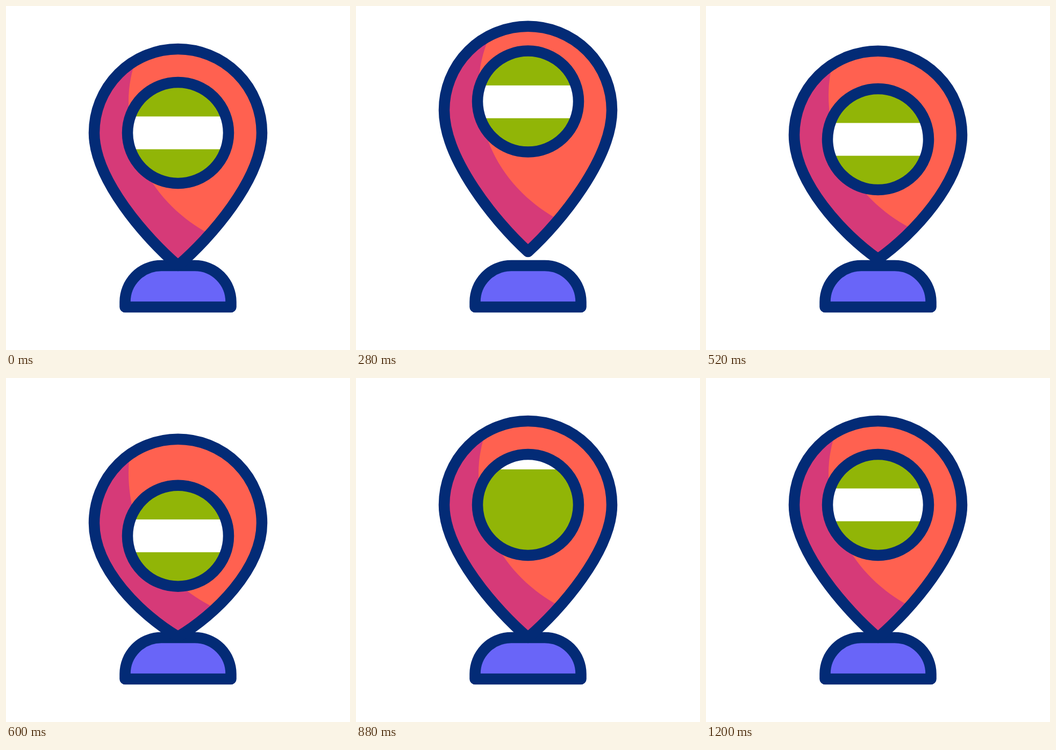
An HTML page for the animation above (1480 ms loop, 640 by 640 pixels).

```html
<!DOCTYPE html>
<html lang="en">
<head>
<meta charset="utf-8">
<title>Map pin</title>
<style>
  html, body { margin: 0; width: 100%; height: 100%; overflow: hidden; background: #fff; }
  svg { display: block; width: 100%; height: 100%; }
  .line { stroke: #032b76; stroke-width: 20.5; stroke-linejoin: round; }
</style>
</head>
<body>
<svg viewBox="0 0 640 640">
  <defs>
    <clipPath id="pinClip"><path class="pin"/></clipPath>
    <clipPath id="discClip"><circle class="disc" cx="320" r="94"/></clipPath>
  </defs>
  <path class="line" fill="#6965f8" d="M221.5 560V550.5A67.5 67.5 0 0 1 289 483H351A67.5 67.5 0 0 1 418.5 550.5V560Z"/>
  <path class="pin" fill="#ff6150"/>
  <g clip-path="url(#pinClip)">
    <path id="shade" fill="#d63a78" d="M284 20Q228 98.5 228 177C228 300 300 383 380 425L430 451V600H100V20Z"/>
  </g>
  <path class="pin line" fill="none"/>
  <circle class="disc" cx="320" r="94" fill="#91b507"/>
  <g clip-path="url(#discClip)" fill="#fff">
    <rect class="band" x="220" width="200" height="61"/>
    <rect class="band" x="220" width="200" height="61"/>
  </g>
  <circle class="disc line" cx="320" r="94" fill="none"/>
</svg>
<script>
const LOOP = 1480, STEP = 40;
const SCROLL = 264;
// Heights of head, disc and tip; then the curve handles of the pin's flanks
const REST = { head: 236, disc: 236, tip: 483, side: 86, spread: 60, rise: 51 };
const RAISED = { head: 184, disc: 164, tip: 451, side: 92, spread: 60, rise: 55 };
const SQUASHED = { head: 274, disc: 300, tip: 483, side: 86, spread: 69, rise: 40 };

const pins = document.querySelectorAll('.pin');
const discs = document.querySelectorAll('.disc');
const bands = document.querySelectorAll('.band');
const shade = document.getElementById('shade');

const smooth = s => s * s * (3 - 2 * s);
const progress = (t, from, to) => Math.min(1, Math.max(0, (t - from) / (to - from)));

// Cubic easing with handles (.33, 0) and (.33, 1)
function glide(x) {
  let low = 0, high = 1;
  for (let i = 0; i < 24; i++) {
    const s = (low + high) / 2;
    if (0.99 * s * (1 - s) + s ** 3 < x) low = s; else high = s;
  }
  return smooth((low + high) / 2);
}

function poseAt(t, start = 72) {
  const keys = [[start, REST], [360, RAISED], [636, SQUASHED], [880, REST]];
  const pose = { ...REST };
  for (let i = 1; i < keys.length; i++) {
    const [from, a] = keys[i - 1], [to, b] = keys[i];
    const amount = smooth(progress(t, from, to));
    for (const part in pose) pose[part] += (b[part] - a[part]) * amount;
  }
  return pose;
}

function pinPath({ head, tip, side, spread, rise }) {
  const flank = head + side, low = tip - rise;
  return `M320 ${tip}C${320 - spread} ${low} 164 ${flank} 164 ${head}` +
    `A156 156 0 0 1 476 ${head}C476 ${flank} ${320 + spread} ${low} 320 ${tip}Z`;
}

function draw(t) {
  const pose = poseAt(t);
  const path = pinPath(pose);
  pins.forEach(pin => pin.setAttribute('d', path));
  shade.setAttribute('transform', `translate(0 ${pose.tip - REST.tip})`);
  discs.forEach(disc => disc.setAttribute('cy', pose.disc));

  const bandY = poseAt(t, 80).disc - 30.5 + SCROLL * glide(progress(t, 623, 1200));
  bands.forEach((band, i) => band.setAttribute('y', bandY - i * SCROLL));
}

const origin = performance.now();
function tick() {
  const t = (performance.now() - origin) % LOOP;
  draw(Math.floor(t / STEP) * STEP);
  requestAnimationFrame(tick);
}
draw(0);
requestAnimationFrame(tick);
</script>
</body>
</html>
```
